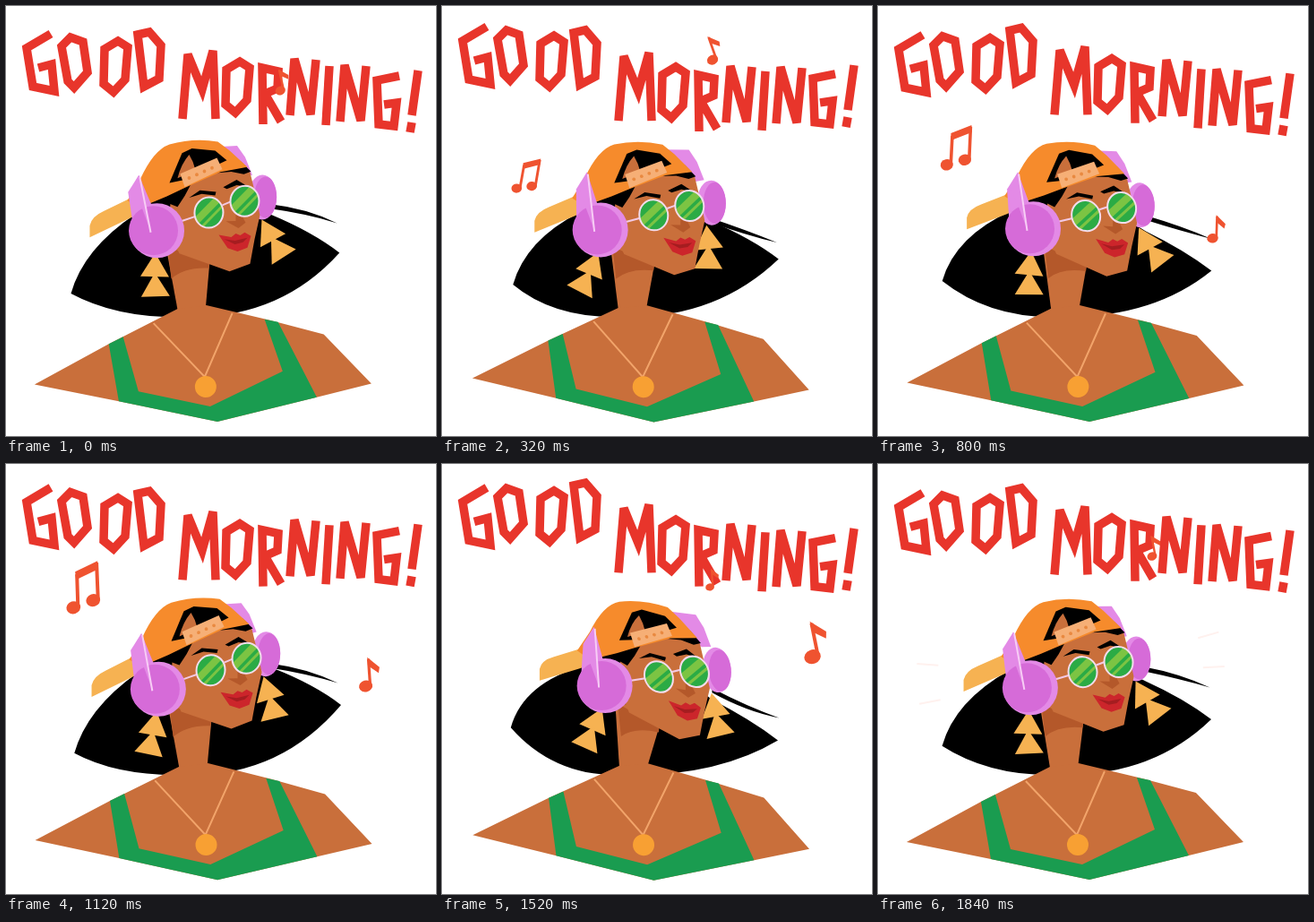
Write an HTML page with a canvas that moves like this. It is 480 px wide and 480 px high and loops after 1920 ms.

```html
<!DOCTYPE html>
<html lang="en">
<head>
<meta charset="utf-8">
<title>Good morning</title>
<style>
  html, body { margin: 0; width: 100%; height: 100%; overflow: hidden; background: #fff; }
  canvas { display: block; width: 100%; height: 100%; }
</style>
</head>
<body>
<canvas id="stage" width="480" height="480" role="img" aria-label="GOOD MORNING!"></canvas>
<script>
const ctx = document.getElementById('stage').getContext('2d');
const LOOP = 1920, BEAT = 960, STEP = 80, RAD = Math.PI / 180;

const RED = '#e8352b', NOTE = '#ef5330', SKIN = '#c96f3b', SHADE = '#b4582a', GREEN = '#1a9c50',
  ORANGE = '#f68b2c', YELLOW = '#f6b252', PINK = '#e38ae6', PURPLE = '#d66bd8', BLACK = '#000';

// Everything sways once per beat; parts differ in range and in when they peak.
const sway = (t, mid, range, peak) => mid + range * Math.cos((t - peak) / BEAT * 2 * Math.PI);

function fill(color, path) {
  ctx.fillStyle = color;
  ctx.fill(new Path2D(path));
}
function stroke(color, width, path) {
  ctx.strokeStyle = color;
  ctx.lineWidth = width;
  ctx.stroke(new Path2D(path));
}
function oval(color, x, y, rx, ry = rx, tilt = 0) {
  ctx.beginPath();
  ctx.ellipse(x, y, rx, ry, tilt, 0, 7);
  ctx.fillStyle = color;
  ctx.fill();
}
function group(transform, draw) {
  ctx.save();
  transform();
  draw();
  ctx.restore();
}

// The bob runs along the words, one step later per letter.
function drawLetters(t) {
  let peak = 840 - STEP;
  const letter = (path, x = 0, y = 0) => {
    peak += STEP;
    group(() => ctx.translate(x, y + sway(t, 0, 4.8, peak) - sway(0, 0, 4.8, peak)),
      () => stroke(RED, 9.5, path));
  };
  const O = 'M-12-19L3-28L14-21L11 15L-2 29L-13 20Z';
  const N = 'M0 0L5-63L23-1L29-62';
  ctx.miterLimit = 3.5;
  letter('M50 31L23 47L30 90L54 95L51 65L36 69');
  letter('M62 45L72 35L86 40L91 74L76 91L69 84Z');
  letter(O, 122, 67);
  letter('M147 32L160 29L173 44L171 81L154 90Z');
  letter('M197 126L203 54L219 93L231 50L234 126');
  letter(O, 258, 90);
  letter('M287 132L286 69L304 73L303 92L289 98L307 129');
  letter(N, 317, 122);
  letter('M361 67L357 133');
  letter(N, 373, 129);
  letter('M439 78L414 83L416 132L433 134L436 108L422 110');
  letter('M460 72L453 122M453 130L451 141');
}

function pairNote() {
  oval(NOTE, -11, 4, 8, 7, -.3);
  oval(NOTE, 11, -4, 8, 7, -.3);
  stroke(NOTE, 4, 'M-6 4L-7-33M16.5-4L15-46');
  fill(NOTE, 'M-9-36L16-48L17-39L-8-27Z');
}
function singleNote() {
  oval(NOTE, 0, 0, 9.5, 8, -.4);
  stroke(NOTE, 4, 'M6-2L-2-38');
  fill(NOTE, 'M-4-40L15-29L15-21L0-28Z');
}

// A note drifts along a curve, growing and tipping over as it goes.
function drift(t, glyph, { from, till, path, grow, turn }) {
  if (t < from) t += LOOP;
  if (t > till) return;
  const u = (t - from) / (till - from);
  const mix = (a, b) => a + (b - a) * u;
  const bend = i => mix(mix(path[0][i], path[1][i]), mix(path[1][i], path[2][i]));
  group(() => {
    ctx.translate(bend(0), bend(1));
    ctx.rotate(mix(...turn) * RAD);
    ctx.scale(mix(...grow), mix(...grow));
  }, glyph);
}
function drawNotes(t) {
  drift(t, pairNote, { from: 240, till: 1300, path: [[93, 207], [84, 176], [87, 146]], grow: [.7, 1.06], turn: [13, -3] });
  drift(t, singleNote, { from: 720, till: 1690, path: [[364, 260], [425, 258], [411, 195]], grow: [.62, 1.06], turn: [16, -2] });
  drift(t, singleNote, { from: 1440, till: 2390, path: [[296, 146], [316, 95], [297, 44]], grow: [.5, .7], turn: [10, -10] });
}

// Faint dashes flash beside the head.
function drawRays(t) {
  if (t % 1200 !== 640) return;
  for (const angle of [184, 169, -16, -3]) {
    group(() => {
      ctx.translate(215, 235);
      ctx.rotate(angle * RAD);
    }, () => stroke('#fff1ee', 2, 'M148 0H172'));
  }
}

function drawHair(t, dx, head) {
  const lx = sway(t, 75.5, 4, 370), ly = sway(t, 309, 15, 100);
  const rx = sway(t, 374, 2, 400), ry = sway(t, 289, 20.5, 610);
  const tipX = sway(t, 373, 3.5, 520), tipY = sway(t, 262, 21.5, 545);
  const drop = ry - 270, fall = tipY - 243;
  fill(BLACK, `M${lx} ${ly}Q${lx + 14} ${ly - 50} ${head(145, 231)}L${head(165, 205)}L${head(215, 200)}
    L${298 + dx * .2} ${229 + drop * .88}Q${rx - 30} ${ry - 23} ${rx} ${ry}
    Q305 350 200 347Q125 349 ${lx} ${ly}`);

  const sx = 297 + dx * .3, sy = 222 + fall * .7;
  const mx = (sx + tipX) / 2 + 2, my = (sy + tipY) / 2 - 6 + fall * .25;
  fill(BLACK, `M${sx} ${sy}Q${mx} ${my} ${tipX} ${tipY}Q${mx} ${my + 6} ${sx} ${sy + 5}`);
}

function drawBody(t, head) {
  const lean = sway(t, .021, .024, 470);
  const body = (x, y) => [x + lean * (475 - y), y + lean * (x - 220)];
  fill(SKIN, `M${head(178, 262)}L${head(228, 285)}L${body(223, 340)}L${body(193, 345)}`);
  fill(SHADE, `M${head(181, 268)}L${head(227.5, 287)}L${head(227, 293)}Q${head(200, 291)} ${head(185, 304)}`);

  group(() => {
    ctx.translate(220, 475);
    ctx.rotate(lean);
    ctx.translate(-220, -475);
  }, () => {
    fill(SKIN, 'M32 422L115 377L192 338L224 334L295 351L355 367L408 422L347 437L236 464L126 441');
    fill(GREEN, 'M115 377L131 369L148 430L228 447L309 408L289 350L304 353L347 437L236 464L126 441');
    stroke('#f2a46a', 2, 'M165 354L222 414L253 343');
    oval('#f8a033', 223, 425, 12);
  });
}

function drawEarring(x, y, upper, lower) {
  const triangle = () => fill(YELLOW, 'M0 0L16 26.5H-16Z');
  group(() => {
    ctx.translate(x, y);
    ctx.rotate(upper * RAD);
  }, () => {
    triangle();
    ctx.translate(0, 22);
    ctx.rotate((lower - upper) * RAD);
    triangle();
  });
}

function drawLens(x, y) {
  group(() => ctx.translate(x, y), () => {
    oval('#2bab45', 0, 0, 16, 17);
    ctx.save();
    ctx.clip();
    stroke('#7cc443', 8, 'M-18 13L14-19');
    stroke('#7cc443', 3, 'M-8 16L18-10');
    ctx.restore();
    ctx.strokeStyle = '#f3dcec';
    ctx.lineWidth = 2;
    ctx.stroke();
  });
}

function drawFace() {
  fill(SKIN, 'M185 205L205 195L262 180L273 187L279 212L284 235L278 262L273 289L250 297L194 276L182 250');
  fill(BLACK, 'M205 214L217 206L235 208L234 212L219 210Z M243 203L258 195L271 203L258 201L247 205Z');
  fill(SHADE, 'M257 222L268 243L260 249L246 241L257 241');
  fill('#cc252b', 'M238 256L252 259L257 255L262 257L267 254L274 258L270 271L259 275L248 271');
  fill('#a51d20', 'M244 261L256 263L270 260L265 265L256 267Z');
  stroke('#f3c9e4', 2, 'M196 240L212 235M242 223L252 219');
  drawLens(227, 231);
  drawLens(267, 219);
}

function drawCap() {
  fill(BLACK, 'M176 213L196 200L208 197L200 212L192 224L180 219Z M234 187L262 174L274 186L266 189L252 186Z');
  fill(YELLOW, 'M94 256V243Q96 233 110 227L140 213L165 205L160 225L138 236');
  fill(ORANGE, 'M136 216L150 193Q165 160 183 154Q210 147 237 152L250 162L270 181L240 186L200 203L180 212L150 224');
  fill(BLACK, 'M183 197L197 164L208 159L234 162L247 173L236 178L200 194');
  fill(SKIN, 'M205 166Q210 174 212 183L192 192Q196 176 205 166');
  fill('#f6af76', 'M195 187L236 170L242 183L200 202');
  for (let i = 0; i < 4; i++) oval('#e98940', 205 + i * 8.5, 192 - i * 3.6, 1.9);
}

function drawNearPhone(x, y, dx) {
  const tipX = x - 20 + dx * .5, tipY = y - 62 - dx * .25;
  fill(PINK, `M${tipX - 12} ${tipY + 19}L${tipX} ${tipY}L${x - 4 + dx * .2} ${y - 24}L${x - 4} ${y}L${x - 27} ${y - 8}`);
  oval(PINK, x, y, 30.5);
  oval(PURPLE, x - 4, y, 27.5);
  fill(PINK, `M${tipX - 9} ${tipY + 17}L${tipX} ${tipY}L${x - 7} ${y + 1}L${x - 17} ${y - 26}`);
  stroke('#f7cdf5', 2, `M${tipX + 1} ${tipY + 2}L${x - 7} ${y + 2}`);
}

function drawFigure(t) {
  const dx = sway(t, 7.2, 8, 520), dy = sway(t, 0, .9, 150);
  const slope = sway(t, .058, .1, 585), far = sway(t, 4.6, 3, 450);
  const head = (x, y) => [x + dx, y + slope * (x - 180) + dy];
  const inHead = (draw, shift = 0) =>
    group(() => ctx.transform(1, slope, 0, 1, dx + shift, dy - 180 * slope), draw);

  drawHair(t, dx, head);
  drawBody(t, head);

  inHead(() => {
    fill(PINK, 'M225 158L257 157L266 170L274 190L264 192L235 185');
    oval(PINK, 285 - dx * .3, 215, 16, 25);
    oval(PURPLE, 288.5 - dx * .3, 215, 12.5, 23);
  }, far + dx * .3);
  drawEarring(...head(286, 240), sway(t, -17, 13, 400), sway(t, -18.5, 20, 360));

  inHead(() => {
    drawFace();
    drawCap();
  });

  const x = 169 + dx * .88, y = head(169, 250)[1];
  drawEarring(x - 2 - dx * .1, y + 25, sway(t, 14, 13, 450), sway(t, 14, 17, 420));
  drawNearPhone(x, y, dx);
}

function render(now) {
  const t = Math.floor(now / STEP) * STEP % LOOP;
  ctx.fillStyle = '#fff';
  ctx.fillRect(0, 0, 480, 480);
  drawRays(t);
  drawFigure(t);
  drawLetters(t);
  drawNotes(t);
}

const start = performance.now();
function tick() {
  render(performance.now() - start);
  requestAnimationFrame(tick);
}
tick();
</script>
</body>
</html>
```
